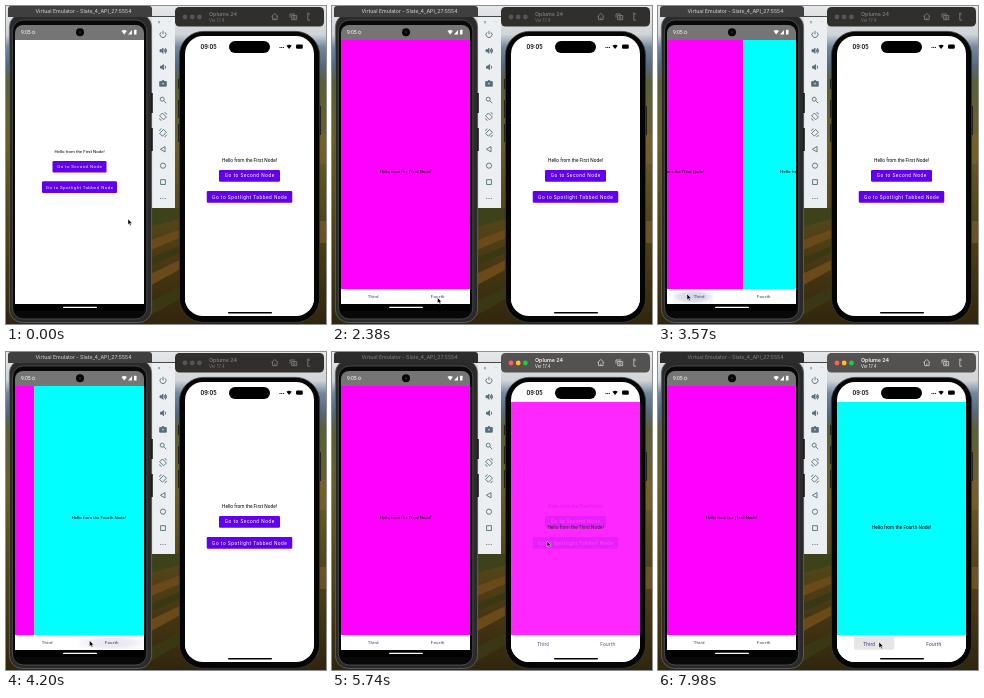
An HTML page for the animation above (8 s loop, 320 by 318 pixels).

```html
<!DOCTYPE html>
<html lang="en">
<head>
<meta charset="utf-8">
<title>Two simulators</title>
<style>
html, body { margin: 0; width: 100%; height: 100%; overflow: hidden; background: #302c22; }
svg { display: block; width: 100vw; height: 100vh; }
text { font-family: Roboto, sans-serif; }
.mac { font-family: Inter, sans-serif; }
.mid { text-anchor: middle; }
.line { fill: none; stroke: #546e7a; stroke-width: .9; }
</style>
</head>
<body>
<svg id="stage" viewBox="0 0 320 318" preserveAspectRatio="none" xmlns="http://www.w3.org/2000/svg">
  <defs>
    <linearGradient id="land" x2="0" y2="1">
      <stop offset="0" stop-color="#e6e8e9"/>
      <stop offset=".09" stop-color="#cfd4d8"/>
      <stop offset=".13" stop-color="#71879f"/>
      <stop offset=".19" stop-color="#55697c"/>
      <stop offset=".24" stop-color="#5b6038"/>
      <stop offset=".42" stop-color="#6b6026"/>
      <stop offset=".64" stop-color="#56481b"/>
      <stop offset=".8" stop-color="#493913"/>
      <stop offset="1" stop-color="#30260e"/>
    </linearGradient>
    <radialGradient id="glow">
      <stop offset="0" stop-color="#d2d2e4"/>
      <stop offset=".65" stop-color="#dedeec"/>
      <stop offset="1" stop-color="#f6f6fb"/>
    </radialGradient>
    <clipPath id="clipA"><path d="M9 305V27a8 8 0 0 1 8-8H130a8 8 0 0 1 8 8V305z"/></clipPath>
    <clipPath id="clipB"><rect x="179" y="30" width="129" height="280" rx="18"/></clipPath>
  </defs>

  <rect width="320" height="318" fill="url(#land)"/>
  <path d="M140 202h38v10l-38 10z" fill="#3d421a"/>
  <path d="M140 236L178 222V230L140 246zM140 270L178 252V261L140 282z" fill="#6b4a1a"/>
  <path d="M140 254L178 238V245L140 262zM140 298L178 278V290L140 312z" fill="#3a3813"/>
  <path d="M310 128h10v30h-10zM310 215h10v22h-10z" fill="#80622a" opacity=".6"/>

  <!-- left window -->
  <rect x="146" y="10.2" width="23" height="2" fill="#222"/>
  <rect x="146" y="11" width="23" height="191" fill="#eceff1"/>
  <g id="tools"></g>
  <rect x="3.4" y="8" width="142.2" height="308.5" rx="13" fill="#2a2a2a" stroke="#666" stroke-width=".8"/>
  <rect x="6.4" y="14" width="134.4" height="299" rx="11" fill="#080808" stroke="#565656" stroke-width=".8"/>
  <path d="M145 87h1.8v20h-1.8zM145 122h1.8v23h-1.8z" fill="#1b1b1b"/>
  <path id="barA" d="M2 11V3a3 3 0 0 1 3-3H143a3 3 0 0 1 3 3V11z"/>
  <text id="nameA" class="mac mid" x="77.5" y="7.2" font-size="5.2" font-weight="500">Virtual Emulator - Slate_4_API_27:5554</text>
  <g clip-path="url(#clipA)">
    <g id="appA"></g>
    <rect x="9" y="19" width="129" height="15" fill="#757575"/>
    <rect x="9" y="298" width="129" height="7" fill="#000"/>
    <rect x="57" y="300.7" width="34" height="1.2" rx=".6" fill="#fff"/>
  </g>
  <circle cx="74" cy="26.3" r="4" fill="#050505"/>
  <circle cx="74" cy="26.3" r="1.2" fill="#1d2430"/>
  <text x="15" y="28.3" font-size="5" fill="#fff">9:05</text>
  <circle cx="27.5" cy="26.4" r="1.3" fill="none" stroke="#fff" stroke-width=".6"/>
  <path d="M115.5 25q2.7-2.2 5.4 0l-2.7 3.4zM122 28.4l4-4.4v4.4z" fill="#fff"/>
  <rect x="128" y="23.8" width="2.5" height="4.8" rx=".5" fill="#fff"/>

  <!-- right window -->
  <rect id="barB" x="169" y="1" width="149" height="19.5" rx="4.5"/>
  <g id="dots"></g>
  <g id="nameB">
    <text class="mac" x="203" y="10.2" font-size="5.3" font-weight="600">Oplume 24</text>
    <text class="mac" x="203" y="16" font-size="4.2">Ver 17.4</text>
  </g>
  <g id="iconsB" fill="none" stroke-width=".8">
    <path d="M265.5 10.5l3.3-3 3.3 3M266.5 10v3.6h4.6V10M268.8 13.5v-2"/>
    <path d="M284 11.5V8h5M285.7 9.5h5v4.2h-5z"/><circle cx="288.2" cy="11.6" r="1"/>
    <path d="M304 8h-2.2v6.2h2.2M301 7.6l1.6-.9"/>
  </g>
  <rect x="173.4" y="25.4" width="140.2" height="291" rx="24" fill="#050505" stroke="#3c3c3c" stroke-width=".8"/>
  <path d="M172.6 73v10M172.6 94v18M172.6 118v18M314.4 100v29" stroke="#222" stroke-width="1.2"/>
  <g clip-path="url(#clipB)">
    <rect x="179" y="30" width="129" height="280" fill="#fff"/>
    <g id="appB"></g>
  </g>
  <rect x="223" y="35" width="41" height="12" rx="6" fill="#000"/>
  <text class="mac" x="194.5" y="43.2" font-size="5.6" font-weight="600">09:05</text>
  <path d="M273.5 41.5h4.5" stroke="#000" stroke-width="1" stroke-dasharray="1 .7"/>
  <path d="M280.5 39.8q2.6-2.2 5.2 0l-2.6 3.2z"/>
  <rect x="290" y="38.6" width="6.8" height="4.2" rx="1.2"/>
  <rect x="222" y="306.1" width="44" height="1.4" rx=".7"/>

  <path id="cursor" d="M0 0V5.8L1.4 4.6 2.3 6.7 3.3 6.2 2.4 4.2H4.2z" fill="#000" stroke="#fff" stroke-width=".45"/>
</svg>

<script>
const LOOP = 8000, STEP = 70, W = 129;
const $ = id => document.getElementById(id);
const set = (el, attrs) => { for (const k in attrs) el.setAttribute(k, attrs[k]); };
const clamp = v => Math.max(0, Math.min(1, v));
const mix = (a, b, k) => a + (b - a) * k;

function add(parent, tag, attrs, content) {
  const el = document.createElementNS('http://www.w3.org/2000/svg', tag);
  set(el, attrs);
  if (content) el.textContent = content;
  return parent.appendChild(el);
}

function label(parent, x, y, size, content, extra) {
  return add(parent, 'text', { x, y, 'font-size': size, class: 'mid', ...extra }, content);
}

// One app screen: two sliding pages with a tab row, and the start page that fades away.
function makeApp(root, o) {
  const cx = o.x + W / 2;
  add(root, 'rect', { x: o.x, y: o.top, width: W, height: 305 - o.top, fill: '#fff' });

  const tabs = add(root, 'g', {});
  const pages = add(tabs, 'g', {});
  [['Third', '#f0f'], ['Fourth', '#0ff']].forEach(([name, fill], i) => {
    add(pages, 'rect', { x: o.x + i * W, y: o.top, width: W, height: 283 - o.top, fill });
    label(pages, cx + i * W, o.pageY, o.size, `Hello from the ${name} Node!`);
  });
  add(tabs, 'rect', { x: o.x, y: 283, width: W, height: 30, fill: '#fff' });
  const ripple = add(tabs, 'rect', { y: 284, height: 13.7, rx: 2, fill: o.ripple });
  ['Third', 'Fourth'].forEach((name, i) =>
    label(tabs, o.x + W * (.25 + i / 2), o.tabY, o.size, name, { fill: '#35316a', 'letter-spacing': .18 }));

  const first = add(root, 'g', {});
  label(first, cx, o.helloY, o.size, 'Hello from the First Node!');
  o.buttons.forEach(([caption, y, w, h]) => {
    add(first, 'rect', { x: cx - w / 2, y, width: w, height: h, rx: 1.3, fill: '#6200ee' });
    label(first, cx + o.gap / 2, y + h / 2 + 1.6, o.size, caption, { fill: '#fff', 'letter-spacing': o.gap });
  });

  return t => {
    const shown = clamp((t - o.open) / 330);
    set(first, { opacity: 1 - shown });
    set(tabs, { opacity: shown });
    set(pages, { transform: `translate(${-W * slide(o.taps, t)})` });
    drawRipple(ripple, o, t);
  };
}

// Critically damped spring, retargeted by each tap [time, page].
function slide(taps, t) {
  let v = 0;
  taps.forEach(([start, to], i) => {
    if (t <= start) return;
    const end = Math.min(t, taps[i + 1] ? taps[i + 1][0] : LOOP);
    const k = (end - start) * .00943;
    v = to + (v - to) * (1 + k) * Math.exp(-k);
  });
  return Math.abs(v - Math.round(v)) < .012 ? Math.round(v) : v;
}

// Presses are [time, tab, pointer x].
function drawRipple(el, o, t) {
  const hit = o.presses.find(([start]) => t >= start + 100 && t < start + 560);
  if (!hit) return set(el, { opacity: 0 });
  const [start, tab, px] = hit, age = t - start;
  const left = o.x + tab * W / 2, right = left + W / 2;
  const c = mix(px, (left + right) / 2, clamp(age / 280));
  const r = 9 + .08 * age;
  const a = Math.max(left, c - r), b = Math.min(right, c + r);
  set(el, { x: a, width: b - a, opacity: 1 - clamp((age - 300) / 260) });
}

const drawA = makeApp($('appA'), {
  x: 9, top: 34, size: 4.4, gap: .42, helloY: 147.4, pageY: 167.4, tabY: 292.4, open: 1330, ripple: 'url(#glow)',
  buttons: [['Go to Second Node', 155, 54, 11.5], ['Go to Spotlight Tabbed Node', 175.3, 75, 11.7]],
  taps: [[2450, 1], [3360, 0], [3850, 1], [4620, 0]],
  presses: [[2380, 1, 106], [3430, 0, 29], [3780, 1, 104], [4550, 0, 52]]
});
const drawB = makeApp($('appB'), {
  x: 179, top: 50, size: 4.8, gap: .52, helloY: 155.8, pageY: 176.6, tabY: 293.8, open: 5460, ripple: '#e6e6e8',
  buttons: [['Go to Second Node', 164, 61, 11.7], ['Go to Spotlight Tabbed Node', 185, 85.5, 11.8]],
  taps: [[7280, 1]],
  presses: [[7240, 1, 268], [7840, 0, 221]]
});

// Emulator side bar
const tools = $('tools');
label(tools, 153, 17.5, 5, '×', { fill: '#546e7a' });
label(tools, 164, 16.5, 5, '–', { fill: '#b0bec5' });
[
  'M-2-2a3 3 0 1 0 4 0M0-3.5V0',
  'M-3-1h1.5L0-2.6V2.6L-1.5 1H-3zM1.3-1.5q1.4 1.5 0 3M2.3-2.8q2.6 2.8 0 5.6',
  'M-2.5-1h1.5L.5-2.6V2.6L-1 1h-1.5zM2-1.5q1.4 1.5 0 3',
  'M-3.3-2h2l.6-1h1.4l.6 1h2v4.6h-6.6zM-1.2.2a1.2 1.2 0 1 0 2.4 0a1.2 1.2 0 1 0-2.4 0',
  'M-2.8-.8a2 2 0 1 0 4 0a2 2 0 1 0-4 0M.7.7L3.2 3.2',
  'M-3.4-.6L-.6-3.4 3.4 .6 .6 3.4zM-3.5 2q.5 1.8 2 2M3.5-2q-.5-1.8-2-2',
  'M3.4-.6L.6-3.4-3.4 .6-.6 3.4zM3.5 2q-.5 1.8-2 2M-3.5-2q.5-1.8 2-2',
  'M2-2.7V2.7L-2.6 0z',
  'M-2.6 0a2.6 2.6 0 1 0 5.2 0a2.6 2.6 0 1 0-5.2 0',
  'M-2.4-2.4h4.8v4.8h-4.8z',
  'M-2.8 0h1M-.5 0h1M1.8 0h1'
].forEach((d, i) => {
  const g = add(tools, 'path', { d, class: 'line', transform: `translate(157 ${28.3 + i * 16.42})` });
  if (i > 0 && i < 4) g.style.fill = '#546e7a';
});

const dots = [179, 186.2, 193.4].map(cx => add($('dots'), 'circle', { cx, cy: 11, r: 2.4 }));
const lights = ['#ff5f57', '#febc2e', '#28c840'];

function focus(right) {
  set($('barA'), { fill: right ? '#2d2c2c' : '#3f3f3f' });
  set($('nameA'), { fill: right ? '#777' : '#c4c4c4' });
  set($('barB'), { fill: right ? '#535250' : '#302f2c' });
  set($('nameB'), { fill: right ? '#f2f2f2' : '#777' });
  set($('iconsB'), { stroke: right ? '#d0d0d0' : '#858585' });
  dots.forEach((d, i) => set(d, { fill: right ? lights[i] : '#565554' }));
}

// Pointer stops: time, x, y
const stops = [
  [0, 122, 213], [630, 122, 213], [1120, 88, 182], [1400, 88, 182], [2170, 105.5, 291.5],
  [2520, 105.5, 291.5], [3220, 29, 288], [3570, 29, 288], [3850, 104, 289], [3990, 104, 289],
  [4480, 52, 288], [4830, 52, 288], [5390, 215, 189], [5740, 215, 189], [6510, 213, 275.5],
  [6720, 213, 290], [6790, 213, 290], [7210, 268.5, 289], [7490, 268.5, 289], [7840, 221, 290], [LOOP, 221, 290]
];

function pointer(t) {
  const i = stops.findIndex(s => s[0] > t);
  const [t0, x0, y0] = stops[i - 1], [t1, x1, y1] = stops[i];
  const k = (t - t0) / (t1 - t0), e = k * k * (3 - 2 * k);
  return `translate(${mix(x0, x1, e)} ${mix(y0, y1, e)})`;
}

function draw(ms) {
  const t = Math.floor(ms % LOOP / STEP) * STEP;
  drawA(t);
  drawB(t);
  focus(t >= 5390);
  set($('cursor'), { transform: pointer(t) });
}

const begin = performance.now();
function tick() {
  draw(performance.now() - begin);
  requestAnimationFrame(tick);
}
draw(0);
requestAnimationFrame(tick);
</script>
</body>
</html>
```
